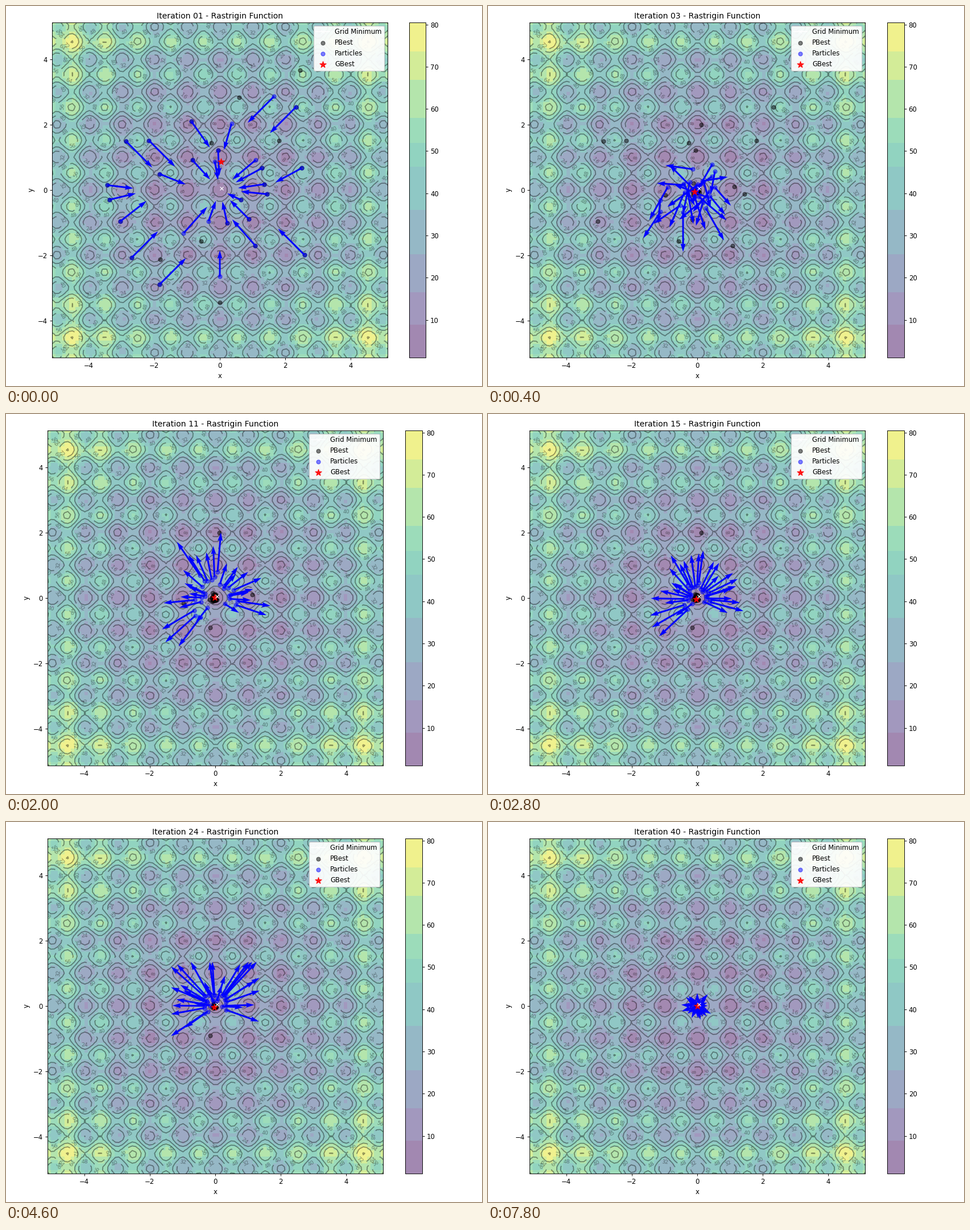
These frames come from a looping animation (837 px wide and 669 px high, 8000 ms). A matplotlib script:

```python
import numpy as np
import matplotlib.pyplot as plt
from matplotlib.animation import FuncAnimation
from matplotlib.colors import ListedColormap

W, H, DPI = 837, 669, 83.7
FRAMES, INTERVAL = 40, 200
LEFT, TOP, SIDE = 73, 29, 590
LIM = 5.12
EXTENT = (-LIM, LIM, -LIM, LIM)
COUNT = 28
rng = np.random.default_rng(12)


def polar(radius, degrees):
    a = np.radians(degrees)
    return np.column_stack([radius * np.cos(a), radius * np.sin(a)])


# A swarm state is complex: position + i * velocity.
def inward():
    """Scattered particles that all head for the centre at a limited speed."""
    spin = np.arange(COUNT) * 137.5 + 40
    pos = polar(rng.uniform(0.7, 3.6, COUNT), spin)
    return pos + 1j * np.clip(-0.65 * pos, -0.8, 0.8)


def crossing():
    """Particles shooting past the centre, mostly downwards."""
    pos = rng.normal((-0.2, 0), (0.6, 0.35), (COUNT, 2))
    heading = rng.normal(255, 55, COUNT)
    return pos + 1j * polar(rng.uniform(0.7, 1.25, COUNT), heading)


def fan(middle, spread, near, far, cap, k):
    """Arrows away from the centre; each starts at the share k of its tip."""
    angle = middle + spread * np.linspace(-1, 1, COUNT) + rng.normal(0, 5, COUNT)
    tip = np.clip(polar(rng.uniform(near, far, COUNT), angle), -cap, cap)
    return tip * (k + 1j * (1 - k))


POSES = [inward(), crossing(),
         fan(105, 135, 0.8, 2.1, 2, 0.4),
         fan(95, 115, 0.6, 1.3, 1, 0.08),
         fan(100, 110, 0.6, 2.1, 1.35, 0.25),
         fan(285, 130, 0.25, 0.55, 0.45, 0.2),
         fan(275, 170, 0.2, 0.5, 0.5, 0.4)]
TIMES = [0, 2, 10, 18, 23, 30, 39]
TURNS = [0, 2, 2, 1, 1.5, 2]
SWELL = [0, 0.4, 0.1, 0, 0.1, 0]

# Personal bests stay at the first points, then jump close to the centre.
start = POSES[0]
FIRST = start.real - start.imag * (np.arange(COUNT) % 4 == 0)[:, None]
JUMP = np.where(np.arange(COUNT) % 3 == 0, rng.integers(4, 7, COUNT), 2)
CLUSTER = rng.normal((-0.03, 0), 0.1, (COUNT, 2))
LATE = [(0.12, 2.0, 16), (-0.15, -0.9, 28), (1.12, 0.1, 13), (-0.97, -0.15, 12)]
GBEST = [(0, 0.04, 0.86), (2, -0.08, -0.06), (8, -0.02, 0.02),
         (14, -0.03, -0.03), (27, 0, 0)]


def swarm(n):
    """Particles oscillate about the centre while drifting between poses."""
    s = min(np.searchsorted(TIMES, n, side="right") - 1, len(TURNS) - 1)
    t = (n - TIMES[s]) / (TIMES[s + 1] - TIMES[s])
    turn = 2j * np.pi * TURNS[s]
    z = (1 - t) * POSES[s] + t * np.exp(turn) * POSES[s + 1]
    z = z * np.exp(-turn * t) * (1 + SWELL[s] * np.sin(np.pi * t))
    return z.real, z.imag


def pbests(n):
    pts = np.where((JUMP > n)[:, None], FIRST, CLUSTER * 0.96 ** n)
    late = [p[:2] for p in LATE if 2 <= n <= p[2]]
    return np.vstack([pts, *late])


def stepped_viridis():
    edges = np.array([1, 8.6, 16.6, 25.5, 36, 46.5, 52, 58, 67, 73.7, 80.6])
    base = plt.get_cmap("viridis")(np.linspace(0, 1, 256))
    band = np.digitize(np.linspace(1.05, 80.5, 256), edges)
    return ListedColormap([base[band == b].mean(axis=0) for b in band])


axis = np.linspace(-LIM, LIM, 100)
x, y = np.meshgrid(axis, axis)
z = 20 + x**2 + y**2 - 10 * (np.cos(2 * np.pi * x) + np.cos(2 * np.pi * y))

fig, ax = plt.subplots(figsize=((W + 0.01) / DPI, (H + 0.01) / DPI), dpi=DPI)
img = ax.imshow(z, extent=EXTENT, origin="lower", cmap=stepped_viridis(),
                alpha=0.5)
bar = fig.colorbar(img, ax=ax)
lines = ax.contour(x, y, z, 10, colors="black", alpha=0.4)
ax.clabel(lines, inline=True, fontsize=8, fmt="%.0f")


def place(n):
    dx, bar_dx = (8, 6.5) if n == 0 else (0, 0)
    low = H - TOP - SIDE
    ax.set_position([(LEFT + dx) / W, low / H, SIDE / W, SIDE / H])
    bar.ax.set_position([(702 + bar_dx) / W, low / H, SIDE / 20 / W, SIDE / H])


# Render the static map once, then reuse it as a plain image.
place(1)
ax.set_axis_off()
fig.canvas.draw()
shot = np.asarray(fig.canvas.buffer_rgba())
shot = shot[TOP:TOP + SIDE, LEFT:LEFT + SIDE].copy()
ax.set_axis_on()
for part in (img, lines, *lines.labelTexts):
    part.set_visible(False)
ax.imshow(shot, extent=EXTENT, origin="upper", interpolation="nearest")

low = axis[50]
ax.plot([low], [low], marker="x", markersize=5, color="white",
        label="Grid Minimum")
pos, vel = swarm(0)
best_dots = ax.scatter(*pbests(0).T, color="black", alpha=0.5, label="PBest")
dots = ax.scatter(*pos.T, color="blue", alpha=0.5, label="Particles")
quiver = ax.quiver(*pos.T, *vel.T, color="blue", width=0.005, angles="xy",
                   scale_units="xy", scale=1)
star = ax.scatter([0], [0], marker="*", s=100, color="red", alpha=0.9,
                  label="GBest")
ax.set(xlim=(-LIM, LIM), ylim=(-LIM, LIM), xlabel="x", ylabel="y")
ax.legend(loc="upper right", framealpha=0.92)


def draw(n):
    place(n)
    pos, vel = swarm(n)
    dots.set_offsets(pos)
    quiver.set_offsets(pos)
    quiver.set_UVC(*vel.T)
    best_dots.set_offsets(pbests(n))
    star.set_offsets([[g[1:] for g in GBEST if g[0] <= n][-1]])
    ax.set_title(f"Iteration {n + 1:02d} - Rastrigin Function")
    return dots, quiver, best_dots, star


anim = FuncAnimation(fig, draw, frames=FRAMES, interval=INTERVAL, repeat=True)
plt.show()
```
